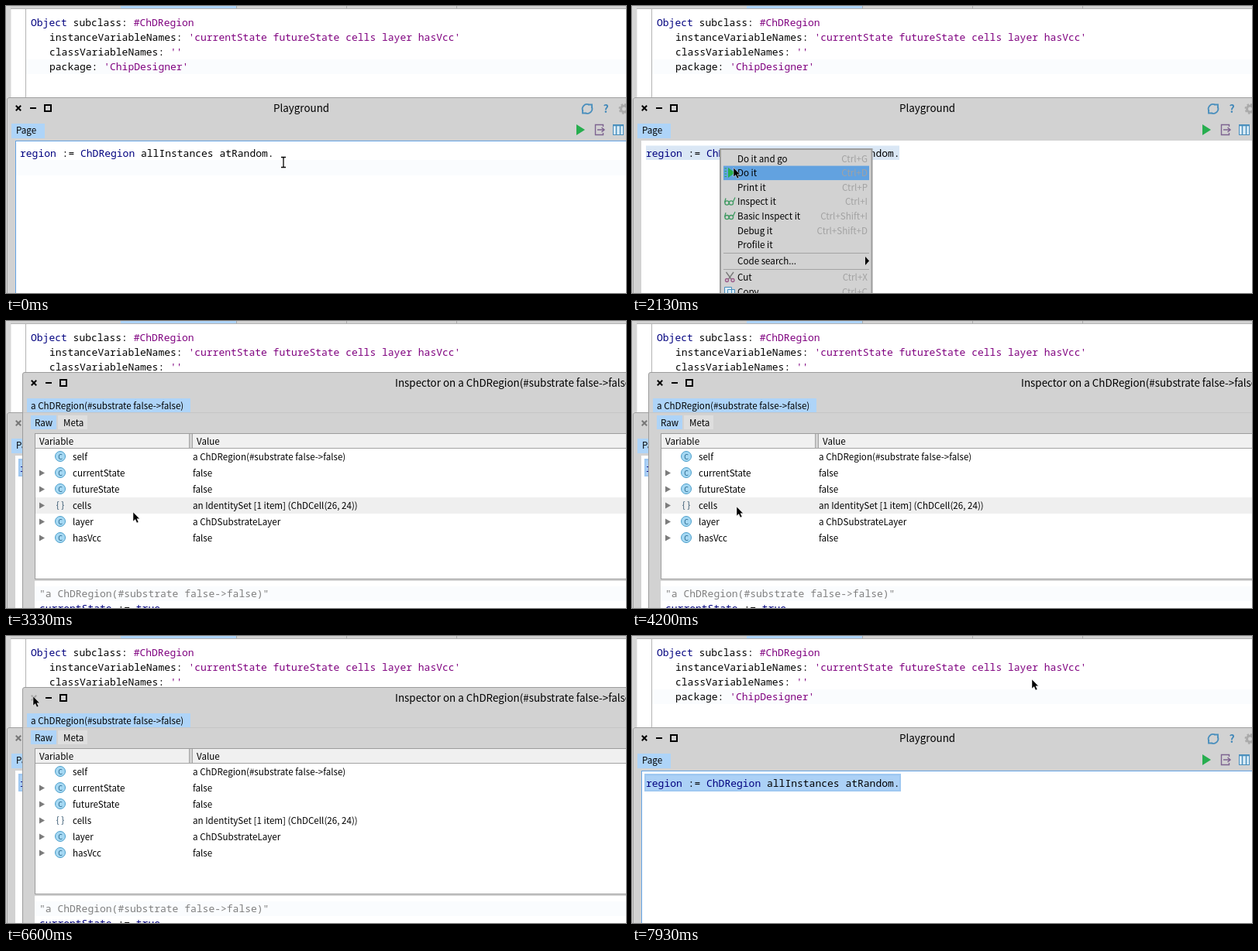
Write an HTML page that moves like this. It is 800 by 371 pixels and loops after 8000 ms.

```html
<!DOCTYPE html>
<html lang="en">
<head>
<meta charset="utf-8">
<title>Playground and inspector</title>
<style>
  html, body { margin: 0; width: 100%; height: 100%; overflow: hidden; background: #fff; }
  svg { display: block; width: 100vw; height: 100vh; }
  text { font: 11.62px "Noto Sans CJK JP", "Noto Sans CJK SC", "Open Sans", sans-serif; white-space: pre; }
  .title { font-size: 13.4px; }
  .code { font: 13px "Noto Sans Mono", "DejaVu Sans Mono", monospace; }
  .name { fill: #00007f; }
  .literal { fill: #7f007f; }
  .key { fill: #a2a2a2; text-anchor: end; }
  .line { fill: none; stroke: #000; }
</style>
</head>
<body>
<svg viewBox="0 0 800 371">
  <!-- class definition -->
  <rect width="800" height="371" fill="#fff"/>
  <rect width="800" height="4" fill="#d2d2d2"/>
  <rect x="148" width="149" height="3" fill="#aed4f8"/>
  <path d="M297.5 0V3M439.5 0V3M581.5 0V3" stroke="#aaa"/>
  <path d="M6 3.5H800" stroke="#b4b4b4"/>
  <rect width="6" height="118" fill="#d6d6d6"/>
  <path d="M6.5 4V118" stroke="#ececec"/>
  <path d="M25.5 4V118" stroke="#b4b4b4"/>
  <rect x="26" y="69" width="774" height="19" fill="#fafcfe"/>
  <text class="code" x="32" y="26"><tspan class="name">Object</tspan> subclass: <tspan class="literal">#ChDRegion</tspan></text>
  <text class="code" x="56" y="45">instanceVariableNames: <tspan class="literal">'currentState futureState cells layer hasVcc'</tspan></text>
  <text class="code" x="56" y="64">classVariableNames: <tspan class="literal">''</tspan></text>
  <text class="code" x="56" y="83">package: <tspan class="literal">'ChipDesigner'</tspan></text>

  <!-- playground -->
  <rect y="118" width="2" height="253" fill="#d6d6d6"/>
  <path d="M1.5 372V121Q1.5 118.5 4 118.5H801V372Z" fill="#d2d2d2" stroke="#a0a0a0"/>
  <g id="playgroundControls"></g>
  <text class="title" x="345" y="137">Playground</text>
  <g fill="none" stroke="#4a8fbd" stroke-width="1.8">
    <path d="M744.5 136A6 6 0 0 1 752 127.5M755.5 130A6 6 0 0 1 748 138.5"/>
    <path d="M751 127.5H756V132M749 138.5H744V134"/>
  </g>
  <text x="770.5" y="138" style="font-size:14px;font-weight:700" fill="#3f87b8">?</text>
  <circle cx="797.5" cy="133" r="4" fill="none" stroke="#aaa" stroke-width="3"/>
  <circle cx="797.5" cy="133" r="6" fill="none" stroke="#aaa" stroke-width="2" stroke-dasharray="2.4 2.3"/>
  <rect x="7" y="152" width="43" height="19" fill="#aed4f8"/>
  <text x="13" y="165">Page</text>
  <path d="M736 153L747 160L736 167Z" fill="#27ae4f"/>
  <path d="M770.5 156V153.500H760.500V166.500H770.500V164M763 160H771M768.500 157L772 160L768.500 163" fill="none" stroke="#7d6390" stroke-width="1.400"/>
  <rect x="783.5" y="153.5" width="13" height="13" fill="#dcedf7" stroke="#4a8fbd"/>
  <path d="M783 154.500H797M787.500 154V167M792.500 154V167" stroke="#4a8fbd" stroke-width="1.500"/>
  <rect x="12" y="174" width="800" height="210" fill="#fff"/>
  <rect id="focusBorder" x="12.5" y="174.5" width="800" height="210" fill="none" stroke="#64a4e4"/>
  <rect id="currentLine" x="13" y="199" width="787" height="20" fill="#fafcfe"/>
  <rect id="outline" x="16" y="178" width="331" height="23" fill="#9fc8f1"/>
  <rect id="selection" y="180.500" height="18.500"/>
  <text class="code" x="18" y="195"><tspan class="name">region</tspan> := <tspan class="name">ChDRegion</tspan> allInstances atRandom.</text>

  <!-- context menu -->
  <g id="menu">
    <rect x="114" y="185" width="195.500" height="200" fill="#d2d2d2" stroke="#9c9c9c" stroke-width="2"/>
    <rect id="menuRow" x="118" width="188" height="18.500" fill="#62a2e0"/>
    <g id="menuItems"></g>
    <path d="M118 319.500H306M118 340.500H306" stroke="#a4a4a4"/>
    <path d="M301 324L306 329.500L301 335Z"/>
    <path d="M124 209L133 215.500L124 222Z" fill="#27ae4f"/>
    <path d="M119.500 210H122M119.500 213.500H122M119.500 217H122M119.500 220.500H122" stroke="#27ae4f"/>
    <g id="glasses" fill="none" stroke="#3f9a62" stroke-width="1.300">
      <circle cx="122.500" cy="254.500" r="2.600"/><circle cx="128" cy="254.500" r="2.600"/>
      <path d="M119.500 254L121 248.500M130.500 253L133 247.500"/>
    </g>
    <use href="#glasses" y="18.600"/>
    <g fill="none" stroke-width="1.300">
      <path d="M121.500 344L128 353M131 344L124.500 353" stroke="#777"/>
      <circle cx="122.500" cy="354.500" r="2" stroke="#9a5a8a"/><circle cx="130" cy="354.500" r="2" stroke="#9a5a8a"/>
    </g>
    <path d="M119.500 363.500H128.500V373H119.500ZM123.500 366.500H132.500V376H123.500Z" fill="#dcedf7" stroke="#4a8fbd"/>
  </g>

  <!-- inspector -->
  <g id="inspector">
    <path d="M21.500 372V69Q21.500 66.500 24 66.500H801V372Z" fill="#d2d2d2" stroke="#9c9c9c"/>
    <g id="inspectorControls"></g>
    <text class="title" x="502" y="85">Inspector on a ChDRegion(#substrate false-&gt;false)</text>
    <rect x="27" y="100" width="211" height="18" fill="#aed4f8"/>
    <text x="32" y="114">a ChDRegion(#substrate false-&gt;false)</text>
    <path d="M22 118.500H800" stroke="#c6c6c6"/>
    <rect x="32" y="122" width="33" height="18" fill="#aed4f8"/>
    <rect x="67" y="122" width="38" height="18" fill="#dedede"/>
    <text x="37" y="136">Raw</text>
    <text x="74" y="136">Meta</text>
    <rect x="37.500" y="145.500" width="780" height="188" fill="#fff" stroke="#9c9c9c"/>
    <rect x="38" y="146" width="762" height="19" fill="#f0f0f0"/>
    <rect x="236" y="146" width="5" height="19" fill="#d2d2d2"/>
    <path d="M38 164.500H800M236.500 146V165M240.500 146V165" stroke="#a4a4a4"/>
    <text x="43" y="160">Variable</text>
    <text x="246" y="160">Value</text>
    <rect id="hoverRow" x="38" width="762" height="21" fill="#efefef"/>
    <g id="variables"></g>
    <rect x="37" y="336" width="763" height="35" fill="#fff"/>
    <rect x="37" y="343" width="763" height="19" fill="#fafcfe"/>
    <text class="code" x="43" y="357" fill="#7f7f7f">"a ChDRegion(#substrate false-&gt;false)"</text>
    <text class="code" x="43" y="376"><tspan class="name">currentState</tspan> := <tspan class="name">true</tspan>.</text>
  </g>

  <!-- mouse pointer -->
  <g id="pointer">
    <path id="arrow" d="M0 0V12L2.800 9.500L4.800 14L7 13L5 8.700H8.500Z" stroke="#fff" stroke-width=".5"/>
    <g id="beam" fill="none">
      <path d="M-3 -6.500H3M0 -6.500V6.500M-3 6.500H3" stroke="#fff" stroke-width="3" opacity=".7"/>
      <path d="M-3 -6.500H3M0 -6.500V6.500M-3 6.500H3" stroke="#000" stroke-width="1.300"/>
    </g>
  </g>
</svg>
<script>
const LOOP = 8000, STEP = 1000 / 15;
const MENU_OPEN = 1500, MENU_CLOSE = 3180, INSPECT = 3310, INSPECT_CLOSE = 6710;
const MENU_TOP = 188, MENU_PITCH = 18.6, ROW_TOP = 165, ROW_PITCH = 21;
const $ = id => document.getElementById(id);
const show = (id, on) => { $(id).style.display = on ? '' : 'none'; };

const controls = (x, y) => `<g transform="translate(${x} ${y})" class="line" stroke-width="2">
  <path class="close" d="M-3.2 -3.2L3.2 3.2M3.2 -3.2L-3.2 3.2"/>
  <path d="M15 0H23"/><rect x="34" y="-4" width="8" height="8"/></g>`;
$('playgroundControls').innerHTML = controls(16, 132);
$('inspectorControls').innerHTML = controls(36, 80);

$('menuItems').innerHTML = [
  ['Do it and go', 'Ctrl+G', 202], ['Do it', 'Ctrl+D', 220], ['Print it', 'Ctrl+P', 239],
  ['Inspect it', 'Ctrl+I', 257], ['Basic Inspect it', 'Ctrl+Shift+I', 276],
  ['Debug it', 'Ctrl+Shift+D', 295], ['Profile it', '', 313], ['Code search...', '', 334],
  ['Cut', 'Ctrl+X', 355], ['Copy', 'Ctrl+C', 374],
].map(([label, key, y]) =>
  `<text x="136" y="${y}">${label}</text><text class="key" x="304" y="${y}">${key}</text>`).join('');

const classIcon = y => `<circle cx="70" cy="${y}" r="6.5" fill="#a5d8f3" stroke="#4b9fcb"/>
  <text x="70" y="${y + 3.5}" text-anchor="middle" fill="#1f5f86" style="font-size:9px">C</text>`;
const setIcon = y => `<text x="70" y="${y + 4}" text-anchor="middle" fill="#35566f">{ }</text>`;
$('variables').innerHTML = [
  ['self', 'a ChDRegion(#substrate false-&gt;false)'], ['currentState', 'false'],
  ['futureState', 'false'], ['cells', 'an IdentitySet [1 item] (ChDCell(26, 24))'],
  ['layer', 'a ChDSubstrateLayer'], ['hasVcc', 'false'],
].map(([name, value], i) => {
  const y = ROW_TOP + 10 + i * ROW_PITCH;
  const expander = i ? `<path d="M43 ${y - 3.5}L50 ${y + .5}L43 ${y + 4.5}Z" fill="#7c7c7c"/>` : '';
  return expander + (name === 'cells' ? setIcon(y) : classIcon(y)) +
    `<text x="86" y="${y + 5}">${name}</text><text x="241" y="${y + 5}">${value}</text>`;
}).join('');

// time, x, y of the pointer
const path = [
  [0, 358, 202], [200, 345, 209], [730, 64, 167], [800, 64, 167], [1130, 115, 192],
  [1800, 115, 192], [2670, 164, 243], [2720, 164, 243], [3000, 164, 247],
  [3600, 164, 247], [3950, 150, 271], [4470, 119, 206], [4530, 119, 205],
  [4670, 119, 205], [5000, 113, 231], [5530, 114, 277], [5600, 115, 279],
  [5800, 115, 279], [6130, 34, 252], [6470, 32, 98], [6600, 35, 78],
  [6700, 35, 78], [7530, 248, 193], [7930, 516, 56], [LOOP, 516, 56],
];

function pointerAt(t) {
  const i = path.findIndex(p => p[0] > t);
  const [t0, x0, y0] = path[i - 1], [t1, x1, y1] = path[i];
  const u = (t - t0) / (t1 - t0), e = u * u * (3 - 2 * u);
  return [x0 + (x1 - x0) * e, y0 + (y1 - y0) * e];
}

function selectionLeft(t, x, y) {
  if (t > 760 || y < 180) return 18;
  return y < 199 ? 18 + 7.8 * Math.round((x - 18) / 7.8) : 345;
}

function draw(t) {
  const [x, y] = pointerAt(t);
  const menuOpen = t >= MENU_OPEN && t < MENU_CLOSE;
  const inspecting = t >= INSPECT && t < INSPECT_CLOSE;
  const focused = t < MENU_OPEN || t >= INSPECT_CLOSE;

  const left = Math.min(345, selectionLeft(t, x, y));
  $('selection').setAttribute('x', left);
  $('selection').setAttribute('width', 345 - left);
  $('selection').setAttribute('fill', menuOpen ? '#dae7f5' : '#acd1f6');
  show('currentLine', left === 345);
  show('outline', t >= MENU_CLOSE);
  show('focusBorder', focused);
  document.querySelector('#playgroundControls .close').style.stroke = inspecting ? '#777' : '';

  show('menu', menuOpen);
  show('menuRow', x >= 118);
  $('menuRow').setAttribute('y', MENU_TOP + MENU_PITCH * Math.floor((y - MENU_TOP) / MENU_PITCH));

  const row = Math.floor((y - ROW_TOP) / ROW_PITCH);
  show('inspector', inspecting);
  show('hoverRow', x >= 38 && row >= 0 && row < 6);
  $('hoverRow').setAttribute('y', ROW_TOP + ROW_PITCH * row);
  document.querySelector('#inspectorControls .close').style.stroke = y < 88 ? '#a4a4a4' : '';

  const beam = focused && y > 174;
  show('beam', beam);
  show('arrow', !beam);
  $('pointer').setAttribute('transform', `translate(${Math.round(x)} ${Math.round(y)})`);
}

function tick() {
  const t = performance.now() % LOOP;
  draw(Math.floor((t + 5) / STEP) * STEP % LOOP);
  requestAnimationFrame(tick);
}
tick();
</script>
</body>
</html>
```
